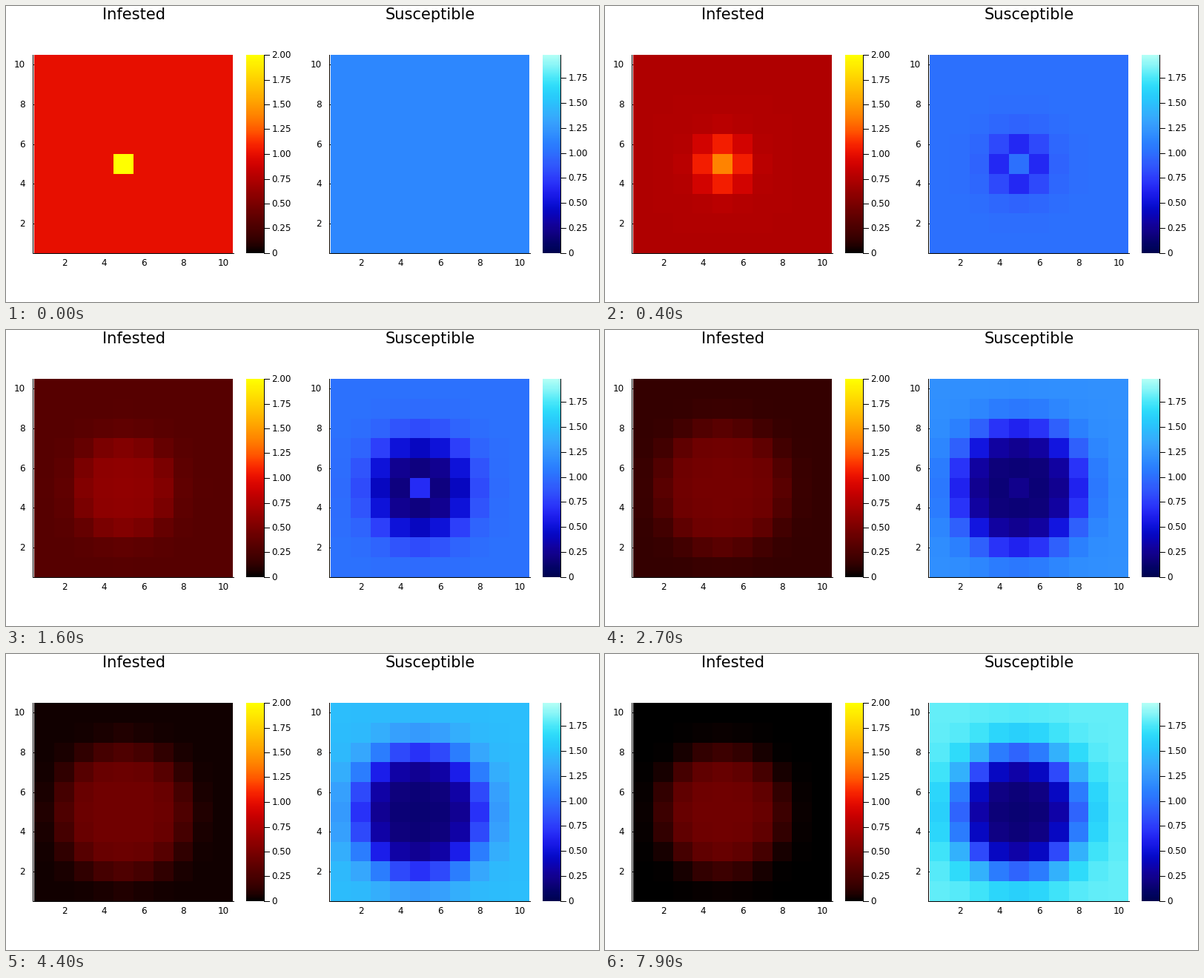
Animation, 800 px wide and 400 px high, one loop 8 s. Source, as a matplotlib script:

```python
import numpy as np
import matplotlib.pyplot as plt
from matplotlib.animation import FuncAnimation
from matplotlib.colors import ListedColormap

W, H, DPI = 800, 400, 100
FRAMES, INTERVAL = 80, 100
N = 10
TOP, BOTTOM, SIDE = 66, 334, 268
# Steps during which the picture stands still, and the step shown instead.
HOLDS = {22: 21, 24: 23, 45: 44, 46: 44, 47: 44, 65: 64}


def smooth(curve, width=27):
    """Round the corners of a polyline, keeping its ends."""
    pad = np.pad(curve, width // 2, mode="reflect", reflect_type="odd")
    return np.convolve(pad, np.ones(width) / width, mode="valid")


def heat_map():
    """Black-red-yellow with evenly rising lightness."""
    pts = np.array([[0, 0, 0], [.85, 0, 0], [1, .15, 0], [1, 1, 0]])
    u = np.linspace(0, 3, 1501)
    rgb = np.stack([np.interp(u, range(4), c) for c in pts.T], axis=1)
    lin = np.where(rgb > .04045, ((rgb + .055) / 1.055) ** 2.4, rgb / 12.92)
    y = lin @ [.2126, .7152, .0722]
    light = np.where(y > .008856, 116 * np.cbrt(y) - 16, 903.3 * y)
    grid = np.linspace(0, light[-1], 256)
    even = [smooth(np.interp(grid, light, c)) for c in rgb.T]
    return ListedColormap(np.clip(np.stack(even, axis=1), 0, 1))


def ice_map():
    """Navy-blue-cyan, a path through Lab space."""
    light = np.linspace(5, 95, 256)
    knots = np.linspace(5, 95, 10)
    a = smooth(np.interp(light, knots, [31, 50, 65, 70, 45, 20, 0, -22, -38, -25]))
    b = smooth(np.interp(light, knots, [-45, -66, -90, -100, -85, -70, -53, -37, -20, -3]))
    fy = (light + 16) / 116
    f = np.stack([fy + a / 500, fy, fy - b / 200], axis=1)
    xyz = np.where(f > 6 / 29, f ** 3, (f - 4 / 29) * 108 / 841) * [.9505, 1, 1.089]
    m = np.array([[3.2406, -1.5372, -.4986],
                  [-.9689, 1.8758, .0415],
                  [.0557, -.2040, 1.0570]])
    lin = np.clip(xyz @ m.T, 0, 1)
    rgb = np.where(lin > .0031308, 1.055 * lin ** (1 / 2.4) - .055, 12.92 * lin)
    return ListedColormap(np.clip(rgb, 0, 1))


cells = np.arange(1, N + 1)
dist = np.hypot(cells[:, None] - 5, cells[None, :] - 5)


def front(t):
    """Radius of the outbreak: spreads quickly, then recedes slowly."""
    return .6 + 2.75 * (1 - np.exp(-(t / 1.5) ** 1.8)) - .04 * t


def inside(radius, width, t):
    """1 within the radius, 0 beyond; the edge starts hard and softens."""
    width = width * (1 - np.exp(-t / .08)) + .005
    return .5 * (1 - np.tanh((dist - radius) / (2 * width)))


def infested(t):
    outer = np.exp(-.72 * t)
    core = .45 + 1.55 * np.exp(-(t / .8) ** 1.2)
    return outer + (core - outer) * inside(front(t) + .12 - .04 * t, .38, t)


def susceptible(t):
    outer = 2 - 1.9 * np.exp(-.29 * t) + 1.05 * np.exp(-t)
    loss = inside(front(t), .5, t)
    loss[dist == 0] *= 1 - np.exp(-(t / 2) ** 3)  # the first cell resists longer
    return outer + (.14 - outer) * loss


plt.rcParams["font.family"] = "DejaVu Sans"
fig = plt.figure(figsize=(W / DPI, H / DPI), dpi=DPI, facecolor="white")
ax = fig.add_axes([0, 0, 1, 1])


def line(x, y):
    ax.plot(x, y, color="black", lw=.72, solid_capstyle="butt", snap=False, zorder=3)


def label(x, y, s, px=12, ha="center"):
    ax.text(x, y, s, fontsize=px * 72 / DPI, ha=ha, va="baseline", color="black")


def mesh(x0, x1, values, cmap, vmax):
    rows, cols = values.shape
    return ax.pcolormesh(np.linspace(x0, x1, cols + 1), np.linspace(BOTTOM, TOP, rows + 1),
                         values, cmap=cmap, vmin=0, vmax=vmax, antialiased=False)


def panel(x0, title, rule, cmap, vmax):
    label(x0 + 134, 18, title, 21)
    grid = mesh(x0, x0 + SIDE, rule(0), cmap, vmax)
    line([x0 - 1.5] * 2, [TOP, BOTTOM + 1])
    line([x0 - 2, x0 + SIDE + 2], [BOTTOM + .5] * 2)
    for v in range(2, N + 1, 2):
        d = (v - .5) * SIDE / N
        label(x0 + d + .5, 351, str(v))
        label(x0 - 12, BOTTOM - d + 4, str(v), ha="right")
        line([x0 - 2, x0], [round(BOTTOM - d) + .5] * 2)

    bar = x0 + 286
    mesh(bar, bar + 24, np.linspace(0, 1, 256)[:, None], cmap, 1)
    line([bar + 24.5] * 2, [TOP, BOTTOM])
    for v in np.arange(0, vmax + .001, .25):
        y = BOTTOM - v / vmax * SIDE
        line([bar + 24, bar + 32], [round(y) + .5] * 2)
        label(bar + 34.5, y + 4, f"{v:.2f}" if v else "0", ha="left")
    return grid


panels = [(panel(38, "Infested", infested, heat_map(), 2.0), infested),
          (panel(438, "Susceptible", susceptible, ice_map(), 1.978), susceptible)]
ax.set(xlim=(0, W), ylim=(H, 0))
ax.axis("off")


def update(step):
    t = HOLDS.get(step, step) * INTERVAL / 1000
    for grid, rule in panels:
        grid.set_array(rule(t))
    return [grid for grid, _ in panels]


anim = FuncAnimation(fig, update, frames=FRAMES, interval=INTERVAL,
                     repeat=True, repeat_delay=0, blit=False)
plt.show()
```
